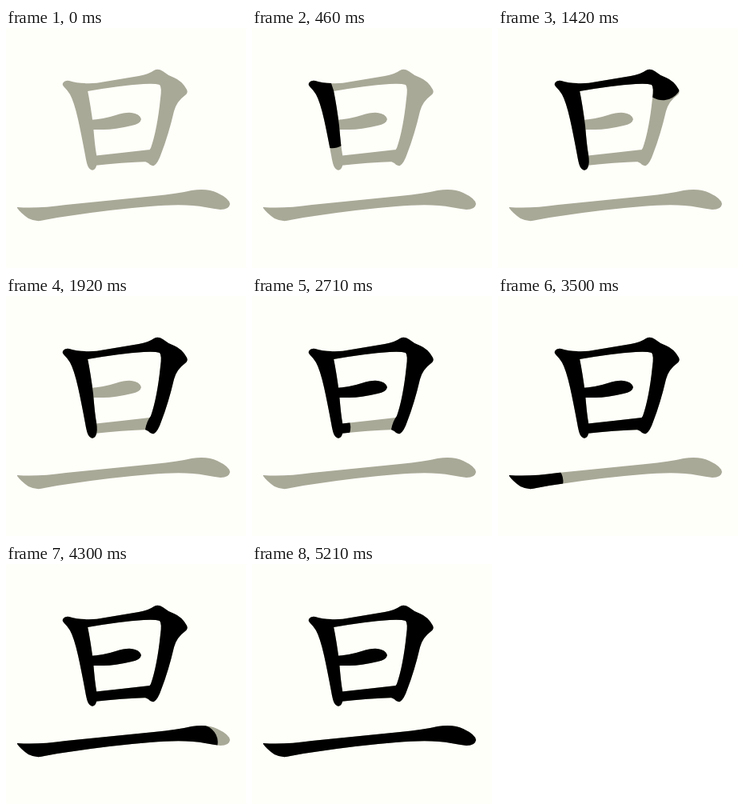
An HTML page with a canvas for the animation above (5.29 s loop, 300 by 300 pixels).

```html
<!DOCTYPE html>
<html lang="zh">
<head>
<meta charset="utf-8">
<title>Stroke order</title>
<style>
html, body { margin: 0; width: 100%; height: 100%; overflow: hidden; background: #fffff9; }
canvas { display: block; width: 300px; height: 300px; }
</style>
</head>
<body>
<canvas id="stage" width="300" height="300"></canvas>
<script>
const LOOP = 5290, FRAMES = 127;
const PAPER = '#fffff9', PALE = '#a9a998', INK = '#000';
const ctx = document.getElementById('stage').getContext('2d');

// Each stroke: outline, path of the round brush that reveals it, and its time span in frames.
const strokes = [
  {
    outline: 'M71 69 Q74 65 79 66 Q88 69 99 69 L102 78 Q106 98 109 122 Q111 147 113 158 Q115 169 112 175 Q108 181 103 174 Q101 171 99 159 Q94 132 90 114 Q85 92 80 83 Q77 78 72 73 Q70 71 71 69Z',
    path: [[58, 52], [88, 82], [109, 160]], radius: 22, start: 0, end: 15
  },
  {
    outline: 'M97 69 Q110 70 124 67 L166 60 Q178 58 185 53 Q190 50 196 54 Q202 59 210 62 Q220 66 226 77 Q228 81 224 84 Q213 92 210 104 Q203 134 194 157 Q190 169 185 172 Q181 173 178 169 L174 167 Q176 156 181 150 Q189 127 193 88 Q195 74 192 71 Q186 69 172 70 Q142 72 102 79Z',
    path: [[80, 75], [197, 62], [206, 66], [180, 165]], radius: 24, start: 19, end: 46
  },
  {
    outline: 'M104 115 Q122 114 137 109 Q150 105 157 106 Q167 107 169 114 Q168 120 157 122 Q136 127 122 127 L105 127Z',
    path: [[86, 121], [150, 114]], radius: 22, start: 51, end: 57
  },
  {
    outline: 'M108 160 Q145 156 180 152 L178 167 Q145 168 110 172Z',
    path: [[76, 166], [160, 160]], radius: 22, start: 62, end: 72
  },
  {
    outline: 'M14 224 Q40 226 75 221 L185 210 Q215 207 232 203 Q252 200 264 206 Q279 213 280 220 Q279 227 268 227 Q260 226 249 224 Q224 219 180 223 Q130 227 78 235 Q62 237 48 240 Q38 243 28 238 Q18 231 14 225Z',
    path: [[-8, 235], [262, 222]], radius: 22, start: 77, end: 105
  }
];

for (const s of strokes) {
  s.shape = new Path2D(s.outline);
  s.brush = new Path2D();
  s.length = 0;
  s.path.forEach(([x, y], i) => {
    if (!i) return s.brush.moveTo(x, y);
    s.brush.lineTo(x, y);
    s.length += Math.hypot(x - s.path[i - 1][0], y - s.path[i - 1][1]);
  });
}

function fill(shape, color) {
  ctx.fillStyle = color;
  ctx.fill(shape);
}

function drawInk(s, frame) {
  const progress = (frame - s.start) / (s.end - s.start);
  if (progress <= 0) return;
  if (progress >= 1) return fill(s.shape, INK);
  ctx.save();
  ctx.clip(s.shape);
  ctx.strokeStyle = INK;
  ctx.lineWidth = s.radius * 2;
  ctx.lineCap = ctx.lineJoin = 'round';
  ctx.setLineDash([s.length * progress, 9999]);
  ctx.stroke(s.brush);
  ctx.restore();
}

function draw() {
  const time = performance.now() % LOOP;
  const frame = Math.floor(time / LOOP * FRAMES + 0.05);
  ctx.fillStyle = PAPER;
  ctx.fillRect(0, 0, 300, 300);
  // One combined pale glyph, so overlaps leave no seams.
  const glyph = new Path2D();
  for (const s of strokes) glyph.addPath(s.shape);
  fill(glyph, PALE);
  for (const s of strokes) drawInk(s, frame % FRAMES);
  requestAnimationFrame(draw);
}
draw();
</script>
</body>
</html>
```
